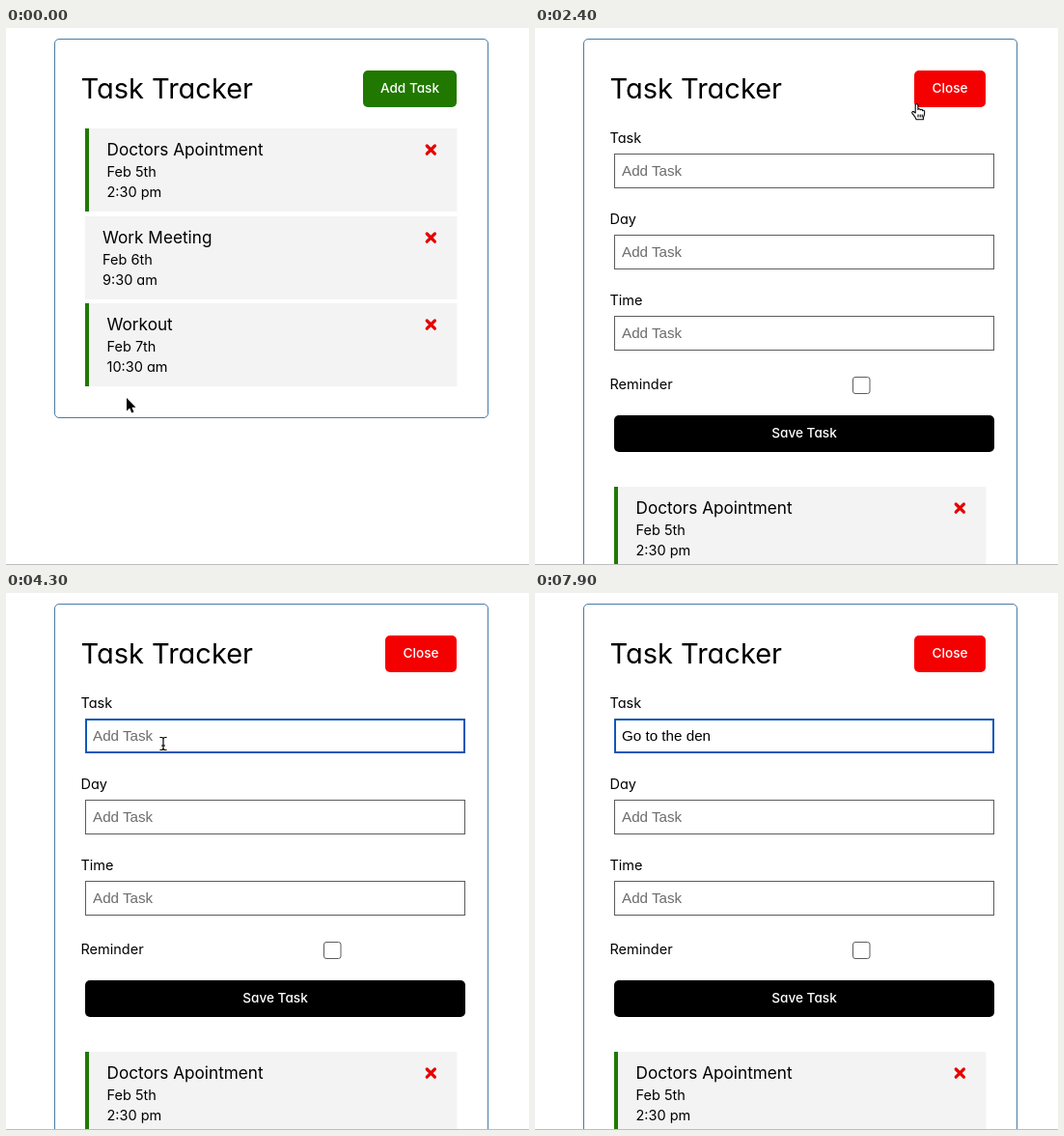
Animation, 542 px wide and 556 px high, one loop 8 s. Source, as an HTML page:

```html
<!DOCTYPE html>
<html lang="en">
<head>
<meta charset="utf-8">
<title>Task Tracker</title>
<style>
  html, body { margin: 0; width: 100%; height: 100%; overflow: hidden; background: #fff; }
  svg { display: block; width: 542px; height: 556px; }
  text { font: 400 14.5px Inter, sans-serif; font-feature-settings: "cv11"; white-space: pre; }
  .title { font-size: 29px; }
  .name { font-size: 17.2px; }
  .button { font-size: 13.6px; font-weight: 500; fill: #fff; text-anchor: middle; }
  .input { font: 15.2px "Liberation Sans", Arial, sans-serif; }
  .hint { fill: #6c6c6c; }
  .box { fill: #fff; stroke: #5c5c5c; }
  .cross { stroke: #e60000; stroke-width: 3.2; stroke-linecap: round; }
</style>
</head>
<body>
<svg id="stage" viewBox="0 0 542 556"></svg>
<script>
const LOOP = 8000, STEP = 100;
const PRESS = 2300, OPEN = 2400, FOCUS = 3800;
const GREEN = '#207800';
const stage = document.getElementById('stage');

const text = (x, y, cls, s) => `<text x="${x}" y="${y}" class="${cls}">${s}</text>`;
const rect = (x, y, w, h, fill, r = 0) =>
  `<rect x="${x}" y="${y}" width="${w}" height="${h}" rx="${r}" fill="${fill}"/>`;
const card = height =>
  `<rect x="50.5" y="11.5" width="449" height="${height}" rx="4.5" fill="#fff" stroke="#4a7ba6"/>`;
const button = (x, y, w, fill, label, id = '') =>
  `<g id="${id}">${rect(x, y, w, 38, fill, 5)}${text(x + w / 2, y + 23, 'button', label)}</g>`;

function task(y, name, day, time, reminder) {
  const x = reminder ? 104.5 : 100;
  return rect(82, y, 385.5, 86, '#f3f3f3') +
    (reminder ? rect(82, y, 4, 86, GREEN) : '') +
    text(x, y + 28, 'name', name) + text(x, y + 50, '', day) + text(x, y + 71, '', time) +
    `<path class="cross" d="M436.2 ${y + 18}l8.2 8.2m0 -8.2l-8.2 8.2"/>`;
}

const tasks = top =>
  task(top, 'Doctors Apointment', 'Feb 5th', '2:30 pm', true) +
  task(top + 91, 'Work Meeting', 'Feb 6th', '9:30 am', false) +
  task(top + 181, 'Workout', 'Feb 7th', '10:30 am', true);

const field = (y, label, id) =>
  text(77.5, y - 11, '', label) +
  `<rect id="${id}" class="box" x="82.5" y="${y + .5}" width="393" height="35"/>` +
  text(90, y + 23, 'input hint', 'Add Task').replace('<text', `<text id="${id}Text"`);

const title = text(77.5, 73, 'title', 'Task Tracker');

stage.innerHTML = `
  <g id="list">${card(392)}${title}${button(370, 44, 97, GREEN, 'Add Task', 'add')}${tasks(104)}</g>
  <g id="form">${card(600)}${title}${button(393, 44, 74, '#f40000', 'Close')}
    ${field(130, 'Task', 'task')}${field(214, 'Day', 'day')}${field(298, 'Time', 'time')}
    <rect id="focus" x="83" y="131" width="392" height="34" rx="1" fill="none" stroke="#1058bd" stroke-width="2"/>
    <rect id="caret" y="139" width="1" height="17"/>
    ${text(77.5, 374, '', 'Reminder')}
    <rect class="box" x="329.5" y="361.5" width="17.5" height="17" rx="2.5"/>
    ${button(82, 401, 394, '#000', 'Save Task')}${tasks(475)}</g>
  ${rect(0, 555, 542, 1, '#bdbdbd')}
  <g id="cursor" stroke-linejoin="round">
    <path id="arrow" stroke="#fff" stroke-width="1.8" paint-order="stroke"
      d="M0 0V13.4L3.2 10.5L5.3 15.4L7.5 14.5L5.4 9.7H9.5Z"/>
    <path id="hand" fill="#fff" stroke="#000" stroke-width="1.1"
      d="M-1.8 9V1C-1.8 -.9 .9 -.9 .9 1V5.5C1 4.3 3.2 4.4 3.3 5.8C3.6 4.9 5.5 5.2 5.6 6.6C6 5.9 7.7 6.2 7.7 7.6
         C7.9 11 6.8 12 6.4 14.2V15.8H-.8C-1.4 13.4 -3.5 11.5 -5 9.4C-6 7.7 -4.2 6.8 -3 8Z
         M1 10.5V13.5M3.2 10.5V13.5M5.2 10.5V13.5"/>
    <g id="beam" fill="none"><path id="beamLine"
      d="M-3.6 -6.5H-2Q0 -6.5 0 -4.8Q0 -6.5 2 -6.5H3.6M-3.6 6.5H-2Q0 6.5 0 4.8Q0 6.5 2 6.5H3.6M0 -5V5M-2 2H2"
      stroke="#fff" stroke-width="2.6"/><use href="#beamLine"/></g>
  </g>`;

const $ = id => document.getElementById(id);
const beamLine = $('beamLine').cloneNode();
beamLine.removeAttribute('id');
beamLine.setAttribute('stroke', '#000');
beamLine.setAttribute('stroke-width', 1.2);
$('beam').querySelector('use').replaceWith(beamLine);

const show = (id, on) => { $(id).style.display = on ? '' : 'none'; };

// Pointer waypoints: time, x, y
const path = [
  [0, 125, 383], [1000, 395, 80], [1800, 395, 80], [2100, 396, 79], [OPEN, 396, 79],
  [2700, 245, 137], [3000, 158, 162], [3100, 161, 162], [3400, 163, 159],
  [3500, 163, 159], [3600, 163, 156], [LOOP, 163, 156]
];
const phrase = 'Go to the den';
const keyTimes = [4900, 5100, 5200, 5500, 5900, 6000, 6400, 6600, 6800, 6900, 7000, 7200, 7300];

function pointerAt(t) {
  const i = path.findIndex(p => p[0] > t);
  const [t0, x0, y0] = path[i - 1], [t1, x1, y1] = path[i];
  const u = (t - t0) / (t1 - t0);
  return [x0 + (x1 - x0) * u, y0 + (y1 - y0) * u];
}

function pointerKind(x, y, open) {
  const inside = (l, t, r, b) => x >= l && x <= r && y >= t && y <= b;
  if (open) {
    if (inside(82, 130, 476, 166)) return 'beam';
    return inside(393, 44, 467, 82) ? 'hand' : 'arrow';
  }
  const overTask = [104, 195, 285].some(top => inside(82, top, 467, top + 86));
  return overTask || inside(370, 44, 467, 82) ? 'hand' : 'arrow';
}

function draw(now) {
  const t = Math.floor(now % LOOP / STEP) * STEP;
  const open = t >= OPEN, typed = keyTimes.filter(k => k <= t).length;
  show('list', !open);
  show('form', open);
  $('add').setAttribute('transform', t >= PRESS
    ? 'translate(418.5 63) scale(.98) translate(-418.5 -63)' : '');

  const input = $('taskText');
  input.textContent = typed ? phrase.slice(0, typed) : 'Add Task';
  input.classList.toggle('hint', !typed);
  show('focus', t >= FOCUS);
  const lastKey = typed ? keyTimes[typed - 1] : FOCUS;
  show('caret', t >= FOCUS && Math.floor((t - lastKey) / 500) % 2 === 0);
  $('caret').setAttribute('x', Math.round(90 + (typed && open ? input.getComputedTextLength() : 0)));

  const [x, y] = pointerAt(t), kind = pointerKind(x, y, open);
  show('cursor', !typed);
  $('cursor').setAttribute('transform', `translate(${x} ${y})`);
  for (const k of ['arrow', 'hand', 'beam']) show(k, k === kind);
}

let start;
function tick(now) {
  start ??= now;
  draw(now - start);
  requestAnimationFrame(tick);
}
draw(0);
requestAnimationFrame(tick);
</script>
</body>
</html>
```
